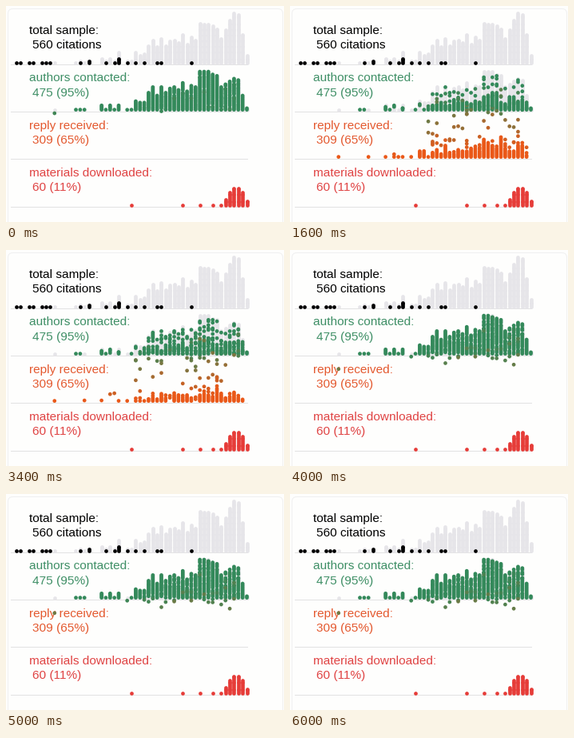
A matplotlib script that plays this animation: 348 by 270 pixels, repeating every 6.2 s.

```python
import matplotlib.pyplot as plt
import numpy as np
from matplotlib.animation import FuncAnimation
from matplotlib.colors import to_rgb
from matplotlib.patches import FancyBboxPatch

W, H, DPI = 348, 270, 100
PT = 72 / DPI                  # points per pixel
FRAMES, INTERVAL = 31, 200
PERIOD, STEP = 985, 50         # one cycle of falls and its time step, in ms
LEAD, SPREAD, FALL = 1.6, 15, 6    # steps: head start, range of departures, one fall
COLS, X0, DX, DY, DOT = 55, 12.6, 5.35, 1.76, 4.7
TOTAL, ASKED, REPLY, LOADED = 70.8, 129.6, 188.6, 248.8   # lowest dot of each row
GREY, GREEN, ORANGE, RED = "#e6e5e9", "#33895a", "#ea5818", "#e63c38"

LEFT = [0, 1, 3, 4, 6, 7, 8, 15, 17, 17, 21, 23, 24, 24, 24, 24,
        26, 28, 30, 33, 34, 41]
KNOTS = [(20, 2), (24, 3), (25, 1), (27, 1), (28, 7), (30, 6), (31, 13), (41, 18),
         (42, 17), (43, 28), (45, 28), (47, 25), (48, 17), (51, 23), (52, 22),
         (53, 11), (54, 2)]


def asked_count(k):
    """Dots in a column: a trend through the knots plus a wave."""
    if k < 20:
        return int(k in (9, 14, 15, 16))
    n = np.interp(k, *zip(*KNOTS))
    if k <= 25:
        n += 1.5 * np.cos(np.pi * k)
    elif 31 < k < 41:
        n += 3.5 * np.cos(2 * np.pi * (k - 32) / 2.25)
    return max(0, round(n))


def loaded_count(k):
    if k < 49:
        return int(k in (27, 39, 43, 46, 48))
    return round(13 * np.sin(np.pi * (k - 48.2) / 6.5))


asked = [asked_count(k) for k in range(COLS)]
loaded = [loaded_count(k) for k in range(COLS)]
left = [LEFT.count(k) for k in range(COLS)]
total = [sum(c) for c in zip(asked, loaded, left)]


def stack(counts, base):
    return np.array([(X0 + DX * k, base - DY * i)
                     for k, n in enumerate(counts) for i in range(n)])


rng = np.random.default_rng(7)
x, y0 = stack(asked, ASKED).T
replied = rng.random(len(x)) < 0.65
start = rng.uniform(0, SPREAD, len(x))
start[~replied] *= 0.5         # dots that stay settle early
start[0], replied[0] = 0, True     # the leftmost dot goes first

# Replies pile up as they leave, the others close ranks
y1 = np.empty_like(y0)
for cx in np.unique(x):
    for group, base, key in ((replied, REPLY, start), (~replied, ASKED, -y0)):
        ids = np.flatnonzero((x == cx) & group)
        ids = ids[np.argsort(key[ids])]
        y1[ids] = base - DY * np.arange(len(ids))


def ease(t):
    t = np.clip(t, 0, 1)
    return np.where(t < 0.5, 4 * t**3, 1 - 4 * (1 - t)**3)


fig = plt.figure(figsize=(W / DPI, H / DPI), dpi=DPI, facecolor="#fefefd")
ax = fig.add_axes([0, 0, 1, 1])
ax.set(xlim=(0, W), ylim=(H, 0))
ax.axis("off")


def dots(points, color, z):
    return ax.scatter(points[:, 0], points[:, 1], s=(DOT * PT) ** 2,
                      c=color, linewidths=0, zorder=z)


def label(y, title, value, color):
    for tx, ty, s in ((28.9, y, title), (33.3, y + 18, value)):
        ax.text(tx, ty, s, color=color, family="Liberation Sans",
                size=15.4 * PT, va="baseline", zorder=3)


ax.add_patch(FancyBboxPatch((8, 9), 333, 280, boxstyle="round,pad=5.5,rounding_size=6",
                            fc="#fefefd", ec="#f0f0f0", lw=PT, zorder=0))
for y in (73, 132, 191, 250.5):
    ax.plot([6, 302], [y, y], color="#e2e2e2", lw=PT, zorder=1)

label(35, "total sample:", "560 citations", "black")
label(94.5, "authors contacted:", "475 (95%)", "#3f8f66")
label(153.7, "reply received:", "309 (65%)", "#e4592f")
label(213, "materials downloaded:", "60 (11%)", "#e04444")

dots(stack(total, TOTAL), GREY, 2)
dots(stack(asked, ASKED), GREY, 2)
dots(stack(left, TOTAL), "black", 4)
dots(stack(loaded, LOADED), RED, 4)
movers = dots(np.column_stack([x, y0]), GREEN, 5)
green, orange = np.array(to_rgb(GREEN)), np.array(to_rgb(ORANGE))


def draw(frame):
    clock = LEAD + (frame * INTERVAL % PERIOD) // STEP
    p = ease((clock - start) / FALL)
    movers.set_offsets(np.column_stack([x, y0 + p * (y1 - y0)]))
    movers.set_facecolors(green + (p * replied)[:, None] * (orange - green))
    return [movers]


anim = FuncAnimation(fig, draw, frames=FRAMES, interval=INTERVAL, repeat=True)
plt.show()
```
